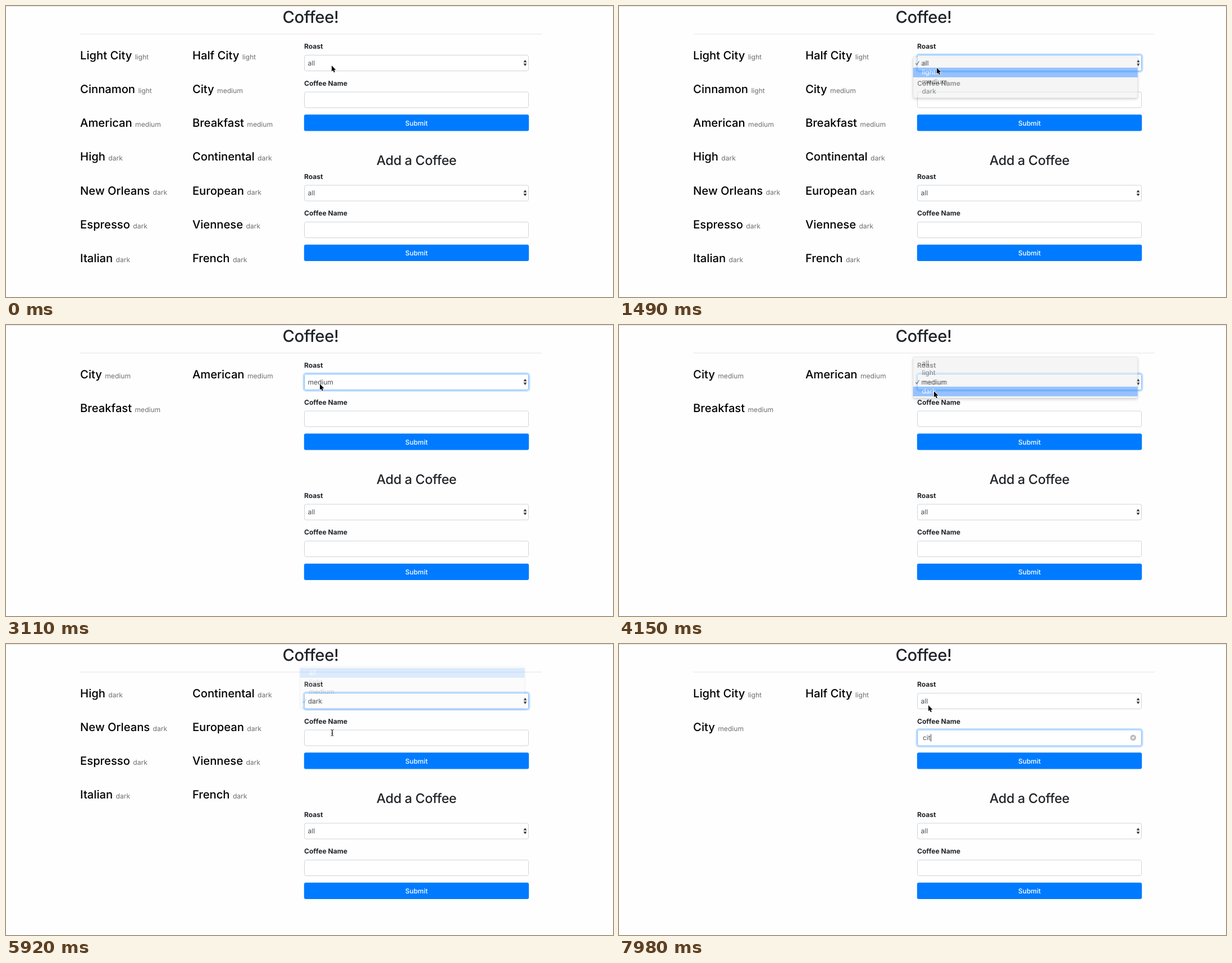
An HTML page for the animation above (8 s loop, 1081 px wide and 518 px high).

```html
<!DOCTYPE html>
<html lang="en">
<head>
<meta charset="utf-8">
<title>Coffee!</title>
<style>
  html, body { margin: 0; width: 100%; height: 100%; overflow: hidden; background: #fefefe; }
  svg { display: block; width: 1081px; height: 518px; font: 12px Inter, Roboto, sans-serif; text-rendering: geometricPrecision; }
  .title { fill: #212529; text-anchor: middle; font-weight: 500; letter-spacing: -.012em; }
  .label { fill: #212529; font-size: 12.1px; font-weight: 700; }
  .value { fill: #495057; }
  .coffee { font-size: 20.2px; font-weight: 500; }
  .coffee tspan { font-size: 12.1px; font-weight: 400; fill: #6f6f6f; }
  .box { fill: #fff; stroke: #ced4da; }
  .box.focus { stroke: #80bdff; }
  .ring { fill: none; stroke: #007bff; stroke-opacity: .25; stroke-width: 2.5; }
  .button { fill: #007bff; }
  .submit { fill: #fff; text-anchor: middle; font-weight: 500; }
  .panel { fill: #efefef; stroke: #000; stroke-opacity: .16; stroke-width: .7; filter: drop-shadow(0 2px 2.5px rgba(0, 0, 0, .32)); }
</style>
</head>
<body>
<svg id="stage" viewBox="0 0 1081 518"></svg>
<script>
const LOOP = 8000, ROW = 16.75;
const roasts = ['all', 'light', 'medium', 'dark'];
const coffees = [
  ['Light City', 1], ['Half City', 1], ['Cinnamon', 1], ['City', 2], ['American', 2],
  ['Breakfast', 2], ['High', 3], ['Continental', 3], ['New Orleans', 3], ['European', 3],
  ['Espresso', 3], ['Viennese', 3], ['Italian', 3], ['French', 3]
];

// Each step changes part of the state and holds until the next one.
const steps = [
  [0, { x: 580, y: 106, beam: false, roast: 0, hover: 0, menu: 0, focus: '', query: '' }],
  [440, { x: 582.5, y: 107 }],
  [740, { focus: 'select', menu: 1 }],
  [890, { x: 575, y: 108 }],
  [1040, { x: 566, y: 110, hover: 1 }],
  [1340, { menu: .95 }],
  [1490, { menu: .56 }],
  [1630, { menu: .18 }],
  [1780, { menu: 0, roast: 1, x: 563, y: 107 }],
  [2230, { menu: 1, x: 562, y: 105 }],
  [2380, { x: 560, y: 109 }],
  [2520, { x: 560, y: 113, hover: 2 }],
  [2820, { menu: .56, y: 111 }],
  [2970, { menu: .18, y: 108 }],
  [3110, { menu: 0, roast: 2, x: 559, y: 105 }],
  [3410, { menu: 1 }],
  [3560, { y: 111, hover: 3 }],
  [3710, { x: 561, y: 118 }],
  [4000, { menu: .95 }],
  [4150, { menu: .56 }],
  [4300, { menu: .18, y: 113 }],
  [4450, { menu: 0, roast: 3, y: 107 }],
  [4590, { x: 562, y: 104 }],
  [4740, { menu: 1, y: 100 }],
  [4890, { x: 567, y: 82, hover: 2 }],
  [5040, { x: 572, y: 63, hover: 1 }],
  [5180, { x: 575, y: 47, hover: 0 }],
  [5630, { menu: .95 }],
  [5770, { menu: .56, x: 577, y: 76 }],
  [5920, { menu: .18, x: 581, y: 158, beam: true }],
  [6070, { menu: 0, roast: 0 }],
  [6520, { focus: 'input' }],
  [6810, { x: 574, y: 144, beam: false }],
  [6960, { x: 559, y: 117 }],
  [7100, { x: 551, y: 109 }],
  [7390, { query: 'c' }],
  [7690, { query: 'ci' }],
  [7980, { query: 'cit' }]
];

const stateAt = t => Object.assign({}, ...steps.filter(s => s[0] <= t).map(s => s[1]));
const text = (x, y, cls, content, extra = '') => `<text x="${x}" y="${y}" class="${cls}" ${extra}>${content}</text>`;

function field(y, focused) {
  const ring = focused ? `<rect class="ring" x="529.8" y="${y - 1.7}" width="402.4" height="31.4" rx="4.5"/>` : '';
  return `${ring}<rect class="box ${focused ? 'focus' : ''}" x="531.5" y="${y}" width="399" height="28" rx="3"/>`;
}

function form(dy, roast, focus, query) {
  const caretX = [541.5, 548.2, 551.2, 555.5][query.length];
  const caret = focus === 'input' ? `<path d="M${caretX} 160.5v13" stroke="#333"/>` : '';
  const clear = query ? `<circle cx="915.7" cy="166.8" r="5.3" fill="#bbb"/>
    <path d="M913.7 164.8l4 4m0-4l-4 4" stroke="#fff" stroke-width="1.2"/>` : '';
  return `<g transform="translate(0 ${dy})">
    ${text(531, 76.2, 'label', 'Roast')}
    ${field(87.5, focus === 'select')}
    ${text(537.5, 105.8, 'value', roasts[roast])}
    <path d="M921.6 100.2l2.9-4.4 2.9 4.4zm0 2.4l2.9 4.4 2.9-4.4z" fill="#343a40"/>
    ${text(531, 141.6, 'label', 'Coffee Name')}
    ${field(153, focus === 'input')}
    ${text(541, 171.3, 'value', query)}${caret}${clear}
    <rect class="button" x="530.8" y="193.2" width="400.4" height="29.4" rx="3"/>
    ${text(731, 212.6, 'submit', 'Submit')}
  </g>`;
}

function list(s) {
  return coffees
    .filter(([name, roast]) => (!s.roast || roast === s.roast) && name.toLowerCase().includes(s.query))
    .map(([name, roast], i) => text(i % 2 ? 331.9 : 132.1, 94.8 + 60.2 * (i >> 1), 'coffee',
      `${name} <tspan>${roasts[roast]}</tspan>`))
    .join('');
}

// The menu opens with its chosen row over the select box.
function menu(s) {
  if (!s.menu) return '';
  const top = 90.3 - s.roast * ROW;
  const rows = roasts.map((name, i) =>
    text(539.5, top + 15.2 + i * ROW, '', name, `fill="${i === s.hover ? '#fff' : '#333'}"`)).join('');
  return `<g opacity="${s.menu}">
    <rect class="panel" x="523.7" y="${top}" width="400" height="73.5" rx="3"/>
    <rect x="523.7" y="${top + 2.7 + s.hover * ROW}" width="400" height="17.2" fill="#4595fd"/>
    ${rows}
    <path d="M528.3 102l2.2 2.7 4-6.5" fill="none" stroke="${s.hover === s.roast ? '#fff' : '#333'}" stroke-width="1.3"/>
  </g>`;
}

function cursor(s) {
  const shape = s.beam
    ? '<path d="M-2.5-5.5q2.5 0 2.5 1.5v8q0 1.5-2.5 1.5M2.5-5.5q-2.5 0-2.5 1.5v8q0 1.5 2.5 1.5M-1.3.8h2.6" fill="none" stroke="#222"/>'
    : '<path d="M0 0v10.6l2.4-2.2 1.6 3.8 1.8-.8-1.6-3.6h3.3z" stroke="#fff" stroke-width="1.4" paint-order="stroke"/>';
  return `<g transform="translate(${s.x} ${s.y})">${shape}</g>`;
}

function scene(t) {
  const s = stateAt(t);
  return `<rect width="1081" height="518" fill="#fefefe"/>
    <rect width="1081" height="1" fill="#dcdcdc"/>
    <rect x="132" y="49.5" width="822" height="1" fill="#e6e6e6"/>
    ${text(542.5, 30.3, 'title', 'Coffee!', 'font-size="29.2"')}
    ${text(731, 282.6, 'title', 'Add a Coffee', 'font-size="23.4"')}
    ${list(s)}
    ${form(0, s.roast, s.focus, s.query)}
    ${form(231.5, 0, '', '')}
    ${menu(s)}
    ${cursor(s)}`;
}

const stage = document.getElementById('stage');
let shown = '';
function draw() {
  const next = scene(performance.now() % LOOP);
  if (next !== shown) stage.innerHTML = shown = next;
  requestAnimationFrame(draw);
}
draw();
</script>
</body>
</html>
```
